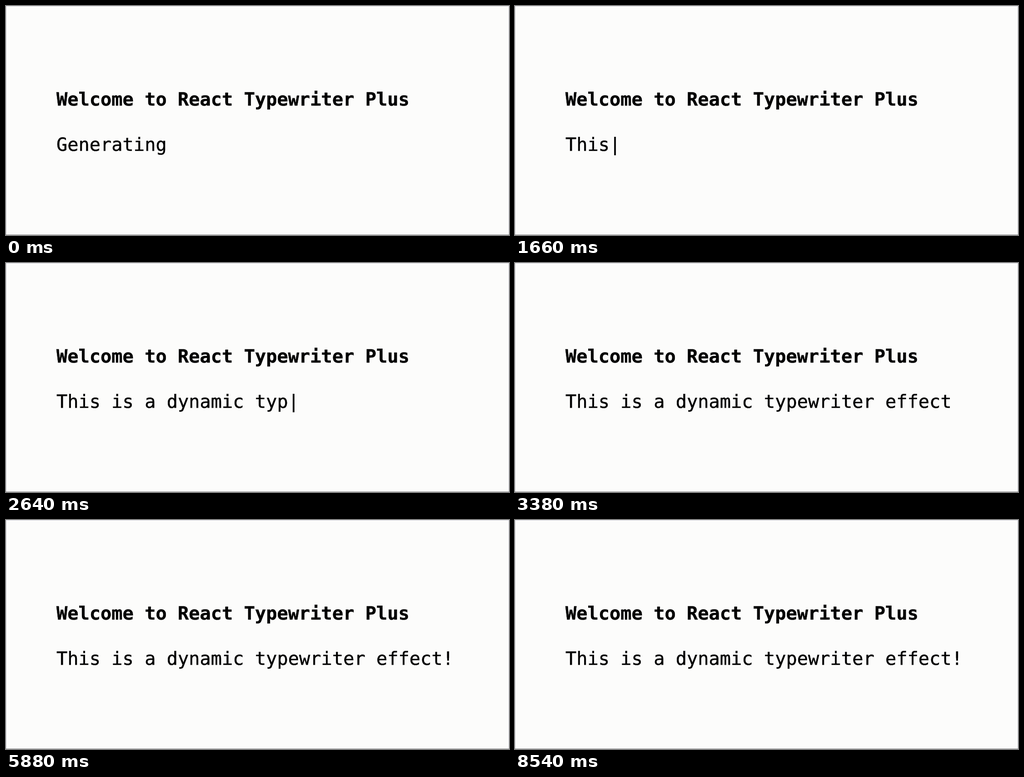
These frames come from a looping animation (1107 px wide and 506 px high, 8560 ms). An HTML page:

```html
<!DOCTYPE html>
<html lang="en">
<head>
<meta charset="utf-8">
<title>Typewriter</title>
<style>
  html, body { margin: 0; width: 100%; height: 100%; overflow: hidden; background: #fcfcfb; }
  svg { display: block; }
  text {
    font: 40.33px "DejaVu Sans Mono", monospace;
    white-space: pre;
    text-rendering: geometricPrecision;
    stroke: #000;
    stroke-width: .5px;
  }
  .title { font-weight: bold; }
</style>
</head>
<body>
<svg width="1107" height="506" viewBox="0 0 1107 506">
  <path d="M.5 505V.5H1106.5V505" fill="none" stroke="#d2d2da"/>
  <path d="M0 505.5H1107" stroke="#858585"/>
  <text class="title" x="110.9" y="219.6">Welcome to React Typewriter Plus</text>
  <text id="line" x="110.9" y="320">Generating</text>
</svg>
<script>
const LOOP = 8560;
const MESSAGE = "This is a dynamic typewriter effect!";
const START = 29;      // tick at which typing begins
const BLINK = 30;      // ticks the cursor stays on, then off
const SPEED = 0.815;   // characters per tick
const line = document.getElementById("line");

// After an opening hold, ticks last 20, 20 and 100 ms in turn.
function tickAt(ms) {
  if (ms < 120) return 0;
  const t = ms - 120, rest = t % 140;
  return 1 + 3 * Math.floor(t / 140) + (rest < 20 ? 0 : rest < 40 ? 1 : 2);
}

function textAt(tick) {
  if (tick < START) return "Generating";
  const typed = MESSAGE.slice(0, Math.floor(SPEED * (tick - START + 0.5)));
  const cursorOn = Math.floor((tick - START) / BLINK) % 2 === 0;
  return typed + (cursorOn ? "|" : "");
}

const begin = performance.now();
function draw() {
  const text = textAt(tickAt((performance.now() - begin) % LOOP));
  if (line.textContent !== text) line.textContent = text;
  requestAnimationFrame(draw);
}
draw();
</script>
</body>
</html>
```
